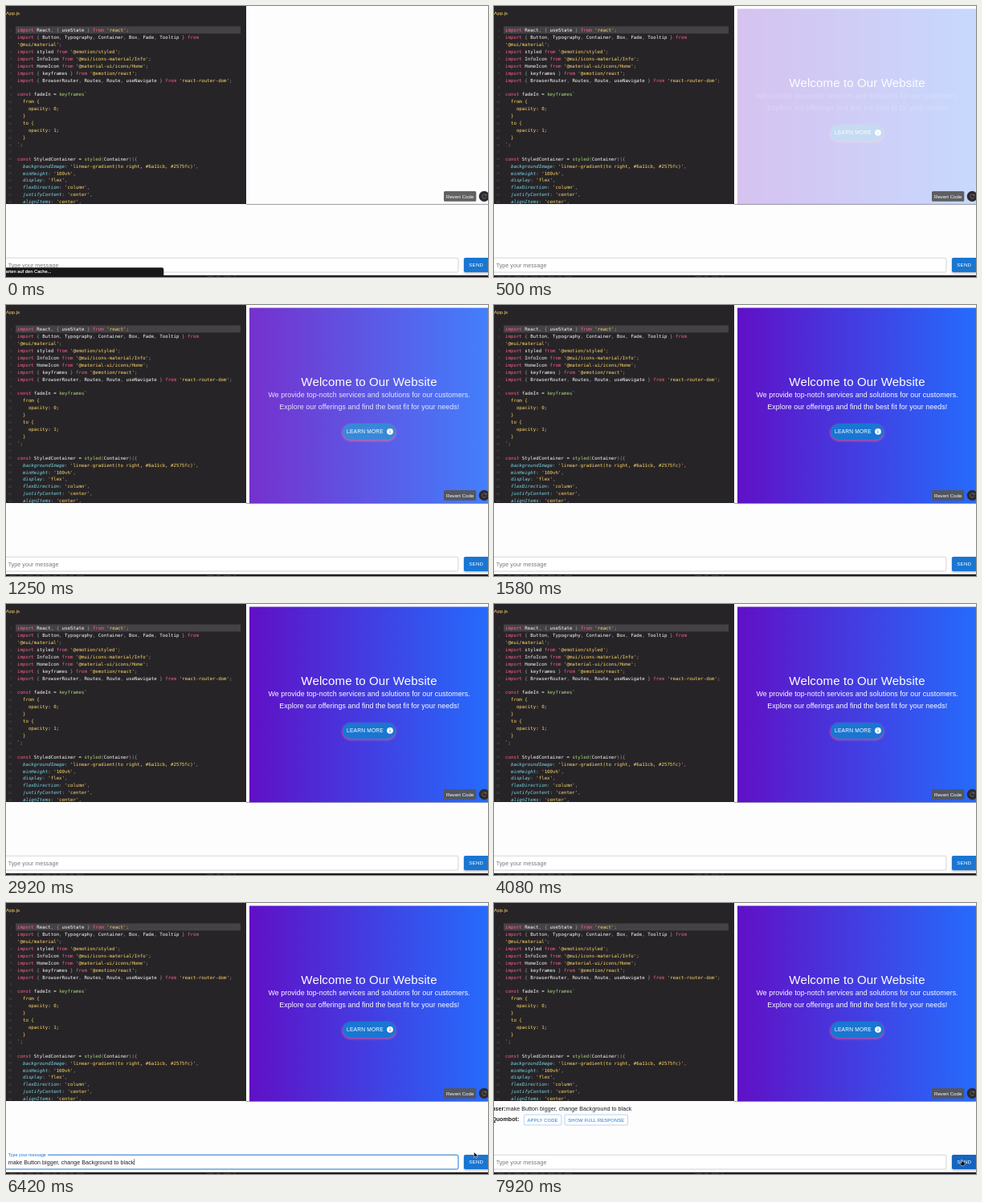
An HTML page for the animation above (8000 ms loop, 600 by 338 pixels).

```html
<!DOCTYPE html>
<html lang="en">
<head>
<meta charset="utf-8">
<title>Code chat</title>
<style>
  html, body { margin: 0; width: 100%; height: 100%; overflow: hidden; background: #fdfdfe; }
  svg { display: block; width: 600px; height: 338px; }
  text { font-family: "Liberation Sans", Arial, sans-serif; white-space: pre; }
  .code text { font: 5.78px "DejaVu Sans Mono", monospace; fill: #fcfcfa; }
  .code .num { font-size: 4px; fill: #4d484d; text-anchor: end; }
  .kw { fill: #ff6188; }
  .str { fill: #ffd866; }
  .fn { fill: #a9dc76; }
  .prop { fill: #78dce8; font-style: italic; }
  .punc { fill: #a19fa0; }
  .mid { text-anchor: middle; fill: #fff; }
  .body { font-size: 7.05px; letter-spacing: .00938em; }
  .h6 { font-size: 8.86px; letter-spacing: .0075em; }
  .btn { font-size: 6.2px; letter-spacing: .02857em; }
  .small { font-size: 5.76px; letter-spacing: .03em; fill: #1976d2; text-anchor: middle; }
  .outline { fill: none; stroke: #8cbae8; stroke-width: .6; }
</style>
</head>
<body>
<svg viewBox="0 0 600 338" xmlns="http://www.w3.org/2000/svg">
  <defs>
    <linearGradient id="hero">
      <stop offset="0" stop-color="#6010c6"/>
      <stop offset="1" stop-color="#256bfc"/>
    </linearGradient>
    <filter id="blur" x="-20%" y="-50%" width="140%" height="200%"><feGaussianBlur stdDeviation="1.2"/></filter>
    <clipPath id="editorClip"><rect width="299" height="247"/></clipPath>
  </defs>
  <rect width="600" height="338" fill="#fdfdfe"/>

  <g clip-path="url(#editorClip)">
    <rect width="299" height="247" fill="#272428"/>
    <text x="0" y="11.3" font-size="6.2" fill="#ffd866">App.js</text>
    <rect x="12" y="25.4" width="280" height="9" fill="#454246"/>
    <g class="code" id="code"></g>
  </g>

  <path d="M299 247.4H600" stroke="#858388" stroke-width=".8"/>
  <g id="page">
    <rect x="303" y="3.5" width="297" height="243.8" fill="url(#hero)"/>
    <text class="mid" x="452" y="100.6" font-size="15.07" letter-spacing=".11">Welcome to Our Website</text>
    <g id="intro">
      <text class="mid h6" x="452.2" y="115.2">We provide top-notch services and solutions for our customers.</text>
      <text class="mid h6" x="452.2" y="129.5">Explore our offerings and find the best fit for your needs!</text>
    </g>
    <rect x="418.2" y="148.6" width="67.6" height="21.4" rx="10.7" fill="#ff6987" opacity=".5" filter="url(#blur)"/>
    <rect x="419" y="148" width="66" height="20" rx="10" fill="#1976d2"/>
    <text x="424" y="160.2" font-size="6.65" letter-spacing=".2" fill="#fff">LEARN MORE</text>
    <circle cx="478" cy="157.8" r="3.9" fill="#fff"/>
    <path d="M478 157.3v2.5M478 155.3v.9" stroke="#1976d2" stroke-width=".9"/>
  </g>

  <rect x="545" y="231" width="40.3" height="12.8" rx="1.6" fill="#555" fill-opacity=".92"/>
  <text class="mid" x="565.2" y="239.7" font-size="6.1">Revert Code</text>
  <circle cx="595.3" cy="237.4" r="6.6" fill="#2d2a2e"/>
  <path d="M597.6 236.1A2.6 2.6 0 1 0 597.8 238.4M597.9 234.6V236.4H596.1" fill="none" stroke="#908e8f" stroke-width=".6"/>

  <g id="question">
    <text class="body" x="-2.8" y="258.6" fill="#1c1c1e"><tspan font-weight="bold">user:</tspan>make Button bigger, change Background to black</text>
  </g>
  <g id="answer">
    <text class="body" x="-2.8" y="272.4" font-weight="bold" fill="#1c1c1e">Quombot:</text>
    <rect class="outline" x="37.3" y="264" width="46.6" height="13" rx="1.8"/>
    <text class="small" x="60.6" y="272.5">APPLY CODE</text>
    <rect class="outline" x="88" y="264" width="78.6" height="13" rx="1.8"/>
    <text class="small" x="127.3" y="272.5">SHOW FULL RESPONSE</text>
  </g>

  <rect id="field" x="-6" y="314.2" width="569" height="17.8" rx="1.8" fill="#fff"/>
  <text id="hint" class="body" x="2.8" y="325.8" fill="#777">Type your message</text>
  <g id="label">
    <rect x="0" y="312.5" width="52" height="3.4" fill="#fdfdfe"/>
    <text x="2.8" y="315.8" font-size="5.3" letter-spacing=".05" fill="#1976d2">Type your message</text>
  </g>
  <text id="typed" class="body" x="2.8" y="325.5" fill="#1c1c1e"></text>
  <path id="caret" stroke="#1c1c1e" stroke-width=".6"/>

  <rect x="570" y="315.2" width="36" height="18" rx="1.8" fill="#000" opacity=".3" filter="url(#blur)"/>
  <rect id="send" x="570" y="314" width="36" height="18" rx="1.8"/>
  <text class="btn" x="576.3" y="325.3" fill="#fff">SEND</text>

  <rect y="335.8" width="600" height="2.2" fill="#1f1b1f"/>
  <path d="M4 337.4H98M250 337.4H286" stroke="#514a4b" stroke-width=".7" stroke-dasharray="9 3 5 4"/>
  <g id="status">
    <path d="M0 326.3H194Q196.3 326.3 196.3 328.6V338H0Z" fill="#18181a"/>
    <text x="-.5" y="333.2" font-size="5.75" fill="#fff" stroke="#fff" stroke-width=".12">arten auf den Cache...</text>
  </g>

  <g id="arrow"><path d="M0 0V7L1.7 5.5L2.8 8L4 7.4L2.9 5.1H5.1Z" fill="#111" stroke="#fff" stroke-width=".5"/></g>
  <g id="beam"><path d="M-1.5 -3.4Q0 -3.4 0 -2.4Q0 -3.4 1.5 -3.4M0 -2.6V2.6M-1.5 3.4Q0 3.4 0 2.4Q0 3.4 1.5 3.4" fill="none" stroke="#222" stroke-width=".7"/></g>
  <g id="hand"><path d="M-1.4 -3.4Q-.8 -4 -.2 -3.4V-1Q1 -1.4 1.6 -.7Q2.9 -.8 3 .6V2Q2.9 3.4 2.1 4.2H-1.3L-3.2 1.3Q-3.2 .2 -1.4 1Z" fill="#111" stroke="#fff" stroke-width=".5"/></g>
</svg>

<script>
const LOOP = 8000;
const $ = id => document.getElementById(id);
const show = (id, on) => $(id).setAttribute('visibility', on ? 'visible' : 'hidden');
const clamp = x => Math.max(0, Math.min(1, x));
const ease = x => (x = clamp(x), x * x * (3 - 2 * x));

const source = `import React, { useState } from 'react';
import { Button, Typography, Container, Box, Fade, Tooltip } from
'@mui/material';
import styled from '@emotion/styled';
import InfoIcon from '@mui/icons-material/Info';
import HomeIcon from '@material-ui/icons/Home';
import { keyframes } from '@emotion/react';
import { BrowserRouter, Routes, Route, useNavigate } from 'react-router-dom';

const fadeIn = keyframes\`
  from {
    opacity: 0;
  }
  to {
    opacity: 1;
  }
\`;

const StyledContainer = styled(Container)({
  backgroundImage: 'linear-gradient(to right, #6a11cb, #2575fc)',
  minHeight: '100vh',
  display: 'flex',
  flexDirection: 'column',
  justifyContent: 'center',
  alignItems: 'center',`;

const rules = [
  ['str', /^('[^']*'|`)/],
  ['kw', /^(import|from|const)\b/],
  ['fn', /^\w+(?=[`(])/],
  ['prop', /^\w+(?=:)/],
  ['punc', /^[{}(),;:]+/],
  ['', /^(\w+|\s+|.)/]
];

function highlight(line) {
  let out = '';
  while (line) {
    const [name, rule] = rules.find(r => r[1].test(line));
    const word = line.match(rule)[0];
    out += `<tspan class="${name}">${word}</tspan>`;
    line = line.slice(word.length);
  }
  return out;
}

function drawCode() {
  let number = 0, inTemplate = false, out = '';
  source.split('\n').forEach((line, i) => {
    const y = 32.1 + i * 8.92;
    const body = inTemplate && !line.includes('`') ? `<tspan class="str">${line}</tspan>` : highlight(line);
    if (line.includes('`')) inTemplate = !inTemplate;
    if (!line.startsWith("'")) out += `<text class="num" x="7.5" y="${y - .3}">${++number}</text>`;
    out += `<text x="14" y="${y}">${body}</text>`;
  });
  $('code').innerHTML = out;
}

const message = 'make Button bigger, change Background to black';
const FOCUS = 5300, TYPE_START = 5400, TYPE_END = 6180, SENT = 6950, REPLY = 7700;

// Pointer stops: time, x, y
const stops = [[4550, 210, 266], [5050, 101, 322], [6180, 101, 322], [6420, 582.5, 310.5], [6700, 583, 323.5], [LOOP, 583, 323.5]];

function pointerAt(t) {
  const i = stops.findIndex(s => s[0] > t);
  if (i < 1) return null;
  const [a, b] = [stops[i - 1], stops[i]];
  const k = ease((t - a[0]) / (b[0] - a[0]));
  return [a[1] + (b[1] - a[1]) * k, a[2] + (b[2] - a[2]) * k];
}

function drawPointer(t) {
  const p = pointerAt(t);
  const hidden = !p || (t > TYPE_START && t < TYPE_END);
  const inRow = p && p[1] > 314 && p[1] < 332;
  const kind = hidden ? '' : inRow && p[0] < 563 ? 'beam' : inRow && p[0] > 570 ? 'hand' : 'arrow';
  for (const id of ['arrow', 'beam', 'hand']) {
    show(id, id === kind);
    if (id === kind) $(id).setAttribute('transform', `translate(${p[0]} ${p[1]})`);
  }
  return kind;
}

function drawField(t, kind) {
  const focused = t >= FOCUS && t < SENT;
  const field = $('field');
  field.setAttribute('stroke', focused ? '#1976d2' : kind === 'beam' ? '#555' : '#c2c2c4');
  field.setAttribute('stroke-width', focused ? 1 : .7);
  show('hint', !focused);
  show('label', focused);
  const count = focused ? Math.round(message.length * clamp((t - TYPE_START) / (TYPE_END - TYPE_START))) : 0;
  const typed = $('typed');
  typed.textContent = message.slice(0, count);
  const end = 3.1 + (count ? typed.getComputedTextLength() : 0);
  $('caret').setAttribute('d', `M${end} 319.2V327`);
  show('caret', focused);
}

function render(t) {
  const fade = ease((t + 40) / 1690);
  $('page').setAttribute('opacity', fade);
  $('intro').setAttribute('opacity', fade);
  show('status', t < 450);
  const kind = drawPointer(t);
  drawField(t, kind);
  $('send').setAttribute('fill', kind === 'hand' ? '#1565c0' : '#1976d2');
  show('question', t >= SENT);
  show('answer', t >= REPLY);
}

drawCode();
const begin = performance.now();
function tick() {
  render((performance.now() - begin) % LOOP);
  requestAnimationFrame(tick);
}
tick();
</script>
</body>
</html>
```
